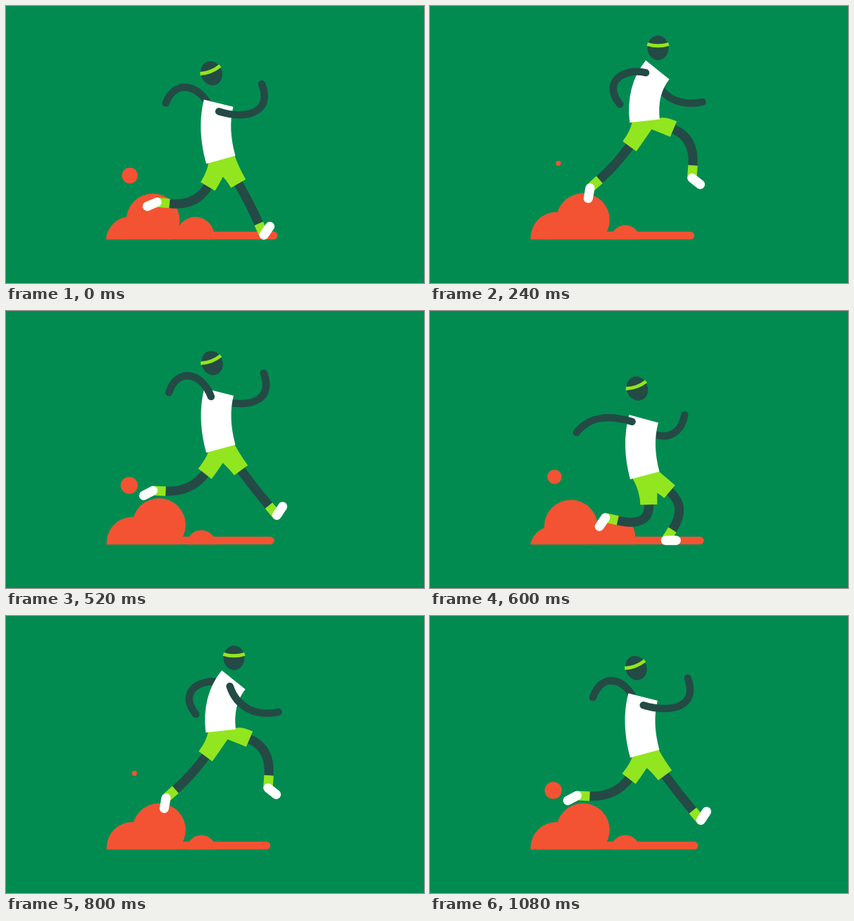
An HTML page with a canvas that plays this animation: 595x395 px, repeating every 1120 ms.

```html
<!DOCTYPE html>
<html lang="en">
<head>
<meta charset="utf-8">
<title>Runner</title>
<style>
  html, body { margin: 0; width: 100%; height: 100%; overflow: hidden; background: #028b51; }
  canvas { display: block; }
</style>
</head>
<body>
<canvas id="stage" width="595" height="395"></canvas>
<script>
const ctx = document.getElementById('stage').getContext('2d');
const STEP = 40, STRIDE = 560, LOOP = 2 * STRIDE, GROUND = 333, HIP_X = 305.5;
const GREEN = '#028b51', DARK = '#244a45', LIME = '#92e61f', ORANGE = '#f35333', WHITE = '#fff';

// Each stride has four beats: contact, load, push, float.
const BEATS = [0, 40, 240, 400];

// Limb angles in degrees at the beats of two strides.
// Leg: thigh, shin, shoe.
const LEG = [
  [60, 63, -55], [40, 86, 0], [126, 132, 100], [131, 153, 120],
  [121, 156, 157], [88, 153, 124], [23, 62, 38], [24, 31.5, -30]
];
// Arm: upper, elbow, forearm, and how far it is stretched.
const ARM = [
  [18, -17, -112, 1.14], [45, -10, -80, .9], [192, 138, 50, 1], [235, 180, 100, 1],
  [245, 195, 112, 1], [197, 182, 128, .85], [72, 27, -12, .87], [30, 0, -85, 1.05]
];

const mod = (n, m) => ((n % m) + m) % m;
const wave = (t, peak, n = 1) => Math.cos(2 * Math.PI * n * (t - peak) / STRIDE);
const beatTime = i => Math.floor(i / 4) * STRIDE + BEATS[mod(i, 4)];

function unit(x, y) {
  const d = Math.hypot(x, y) || 1;
  return [x / d, y / d];
}

function polar([x, y], deg, length) {
  const a = deg * Math.PI / 180;
  return [x + Math.cos(a) * length, y + Math.sin(a) * length];
}

// Smooth cyclic interpolation between poses.
function pose(rows, time) {
  const t = mod(time, LOOP);
  let i = 0;
  while (beatTime(i + 1) <= t) i++;
  const [p, a, b, n] = [-1, 0, 1, 2].map(k => rows[mod(i + k, rows.length)]);
  const [tp, ta, tb, tn] = [-1, 0, 1, 2].map(k => beatTime(i + k));
  const d = tb - ta, u = (t - ta) / d, v = 1 - u;
  return a.map((av, j) => {
    const ma = (b[j] - p[j]) / (tb - tp) * d, mb = (n[j] - av) / (tn - ta) * d;
    return av * (1 + 2 * u) * v * v + ma * u * v * v + b[j] * u * u * (3 - 2 * u) - mb * u * u * v;
  });
}

function bodyAt(t) {
  const y = 186.5 + 37.4 * wave(t, 60) + 11.8 * wave(t, 60, 2);
  const lean = 8 + 11 * wave(t, 270);
  return {
    hip: [HIP_X, y],
    spine: [HIP_X - 11 + lean / 3, y - 43],
    shoulder: [HIP_X + lean, y - 80 + lean * lean / 42],
    head: [HIP_X - 8.5 + 1.5 * lean, y - 115.5 + 9 * wave(t, 240) + 3.5 * wave(t, 225, 2)],
    tilt: lean - 18.5
  };
}

function legAt(t, hip) {
  const [thigh, shin, shoe] = pose(LEG, t);
  const hem = polar(hip, thigh - 6, 43);
  const knee = polar(hem, thigh, 33);
  const bend = (shin - thigh) * Math.PI / 180;
  const sock = polar(hem, shin, 64 * Math.cos(.6 * bend));
  sock[1] = Math.min(sock[1], 312);
  return { hem, knee, sock, shoe };
}

function line(color, width, cap, trace) {
  ctx.strokeStyle = color;
  ctx.lineWidth = width;
  ctx.lineCap = cap;
  ctx.beginPath();
  trace();
  ctx.stroke();
}

function segment(color, width, cap, from, to) {
  line(color, width, cap, () => { ctx.moveTo(...from); ctx.lineTo(...to); });
}

function disc(x, y, r) {
  ctx.beginPath();
  ctx.arc(x, y, Math.max(r, 0), 0, 2 * Math.PI);
  ctx.fill();
}

// A puff swells, drifts left, then slows and sinks.
function drawPuff(age) {
  const x = Math.max(329.6 - .215 * age, 228 - .06 * age);
  const y = 325 - 20 * Math.cos((age - 530) * .00686);
  disc(x, y, 38 * (1 - ((age - 610) / 450) ** 4));
}

// The small ball shoots up out of the dust and shrinks away.
function drawBall(age) {
  const x = 170.5 + .028 * age + 24 * Math.exp(-age / 40);
  const y = 220.5 + 88.5 * Math.exp(-age / 140);
  disc(x, y, 14.3 * (1 - (age / 530) ** 1.6));
}

function drawDust(t) {
  segment(ORANGE, 11, 'round', [230, 327.3], [373.5 + 12 * wave(t, 80), 327.3]);
  ctx.fillStyle = ORANGE;
  ctx.save();
  ctx.beginPath();
  ctx.rect(0, 0, 595, GROUND);
  ctx.clip();
  for (let age = 160 + mod(t - 160, STRIDE / 2); age < 1050; age += STRIDE / 2) drawPuff(age);
  drawBall(mod(t - 360, STRIDE));
  ctx.restore();
}

function drawArm(t, [x, y]) {
  const [upper, elbow, fore, reach] = pose(ARM, t);
  const swing = Math.cos(upper * Math.PI / 180);
  const a = [x - 8 + 9 * swing, y + 8 + 4 * swing];
  const b = polar(a, upper, 36 * reach);
  const c = polar(b, elbow, 35 * reach);
  const hand = polar(c, fore, 38 * reach);
  line(DARK, 10.5, 'round', () => {
    ctx.moveTo(...a);
    ctx.bezierCurveTo(...b, ...c, ...hand);
  });
}

function drawLeg({ hem, knee, sock, shoe }) {
  const [dx, dy] = unit(knee[0] - hem[0], knee[1] - hem[1]);
  const [ex, ey] = unit(sock[0] - knee[0], sock[1] - knee[1]);
  const below = d => [sock[0] + ex * d, sock[1] + ey * d];
  line(DARK, 13, 'butt', () => {
    ctx.moveTo(hem[0] - dx * 4, hem[1] - dy * 4);
    ctx.lineTo(...hem);
    ctx.quadraticCurveTo(...knee, ...sock);
  });
  segment(LIME, 13.5, 'butt', sock, below(16));
  segment(WHITE, 13.2, 'round', below(18), polar(below(18), shoe, 15));
}

// One leg of the shorts, from the whole waist down to its hem.
function drawShorts({ hem: [x, y], knee }, left, right) {
  const [dx, dy] = unit(knee[0] - x, knee[1] - y);
  const a = [x - dy * 12, y + dx * 12], b = [x + dy * 12, y - dx * 12];
  const above = p => [p[0] - dx * 20, p[1] - dy * 20];
  ctx.fillStyle = LIME;
  ctx.beginPath();
  ctx.moveTo(...left);
  ctx.quadraticCurveTo(...above(a), ...a);
  ctx.lineTo(...b);
  ctx.quadraticCurveTo(...above(b), ...right);
  ctx.fill();
}

function drawHead([x, y], tilt) {
  ctx.save();
  ctx.translate(x, y);
  ctx.rotate(tilt * Math.PI / 180);
  ctx.fillStyle = DARK;
  ctx.beginPath();
  ctx.ellipse(0, 0, 15, 17.5, 0, 0, 2 * Math.PI);
  ctx.fill();
  line(LIME, 5, 'butt', () => {
    ctx.moveTo(-15.3, -5.4);
    ctx.quadraticCurveTo(0, -.4, 15.3, -5.4);
  });
  ctx.restore();
}

function draw(t) {
  const { hip, spine, shoulder, head, tilt } = bodyAt(t);
  const legs = [legAt(t + STRIDE, hip), legAt(t, hip)];
  const [ux, uy] = unit(spine[0] - hip[0], spine[1] - hip[1]);
  const waist = d => [hip[0] - uy * d, hip[1] + ux * d];

  ctx.fillStyle = GREEN;
  ctx.fillRect(0, 0, 595, 395);
  drawDust(t);
  drawArm(t + STRIDE, shoulder);
  legs.forEach(drawLeg);
  legs.forEach(leg => drawShorts(leg, waist(-18), waist(20.5)));
  line(WHITE, 43, 'butt', () => {
    ctx.moveTo(hip[0] - ux, hip[1] - uy);
    ctx.quadraticCurveTo(...spine, ...shoulder);
  });
  drawArm(t, shoulder);
  drawHead(head, tilt);
}

const start = performance.now();
function tick() {
  const t = (performance.now() - start) % LOOP;
  draw(Math.floor(t / STEP) * STEP);
  requestAnimationFrame(tick);
}
tick();
</script>
</body>
</html>
```
